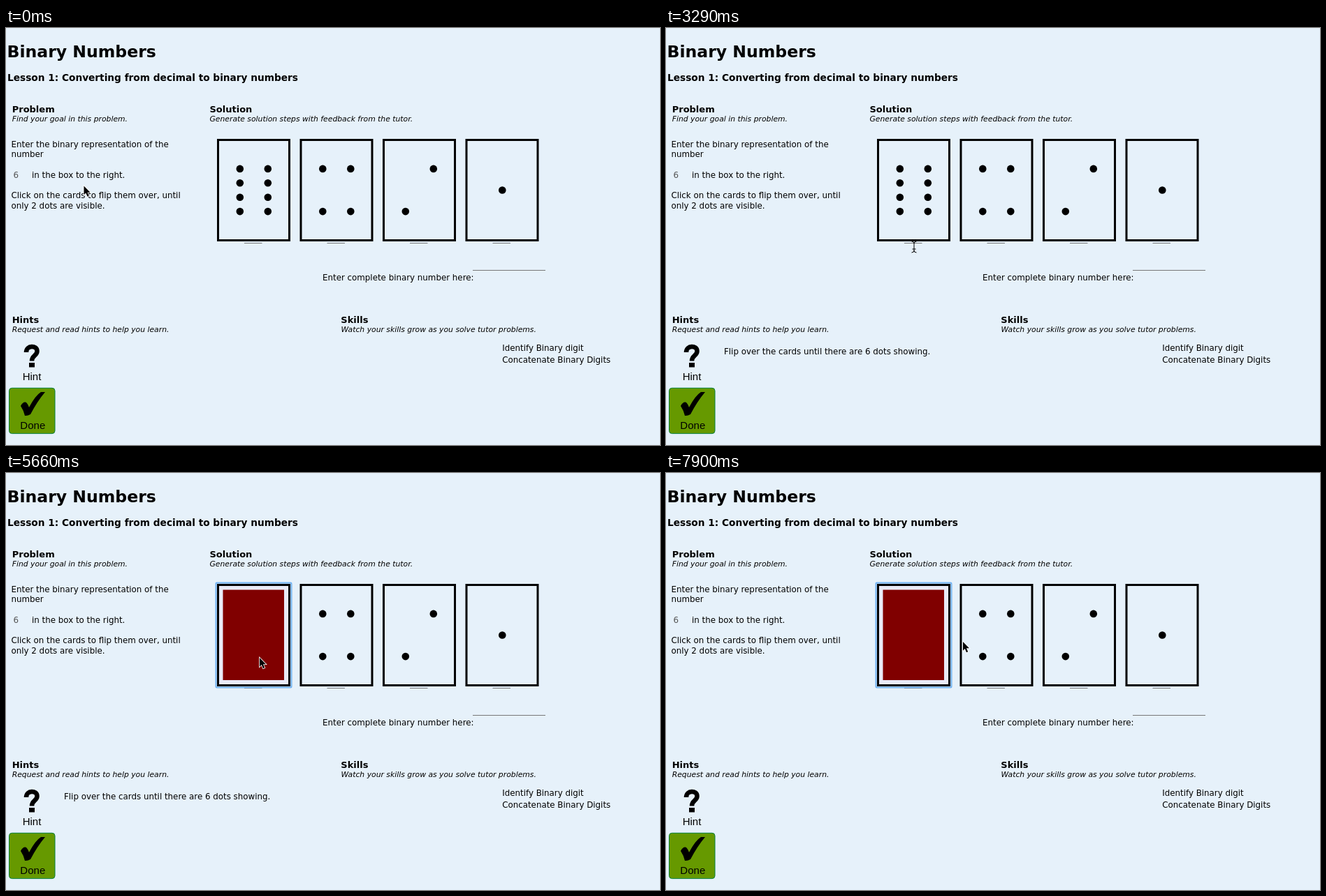
Recreate the animation shown at these times as an HTML page. Size 936x598 px, loop 8 s.

```html
<!DOCTYPE html>
<html lang="en">
<head>
<meta charset="utf-8">
<title>Binary lesson</title>
<style>
html, body { margin: 0; width: 100%; height: 100%; overflow: hidden; background: #e6f1fa; }
svg { display: block; }
text { font: 11.85px "DejaVu Sans", Verdana, sans-serif; }
.title { font-size: 23.55px; font-weight: bold; }
.lesson { font-size: 13.7px; font-weight: bold; }
.head { font-size: 13px; font-weight: bold; }
.note { font-size: 10.8px; font-style: italic; }
.button { font: 15px "Liberation Sans", Arial, sans-serif; text-anchor: middle; }
.line { stroke: #777; fill: none; }
.card { stroke: #000; stroke-width: 3; fill: none; }
</style>
</head>
<body>
<svg width="936" height="598" viewBox="0 0 936 598">
  <text class="title" x="1.5" y="42">Binary Numbers</text>
  <text class="lesson" x="2" y="76">Lesson 1: Converting from decimal to binary numbers</text>

  <text class="head" x="8.7" y="120.5">Problem</text>
  <text class="note" x="8.7" y="134.3">Find your goal in this problem.</text>
  <text x="7.5" y="171">Enter the binary representation of the</text>
  <text x="7.5" y="185">number</text>
  <text x="10.5" y="215" fill="#555">6</text>
  <text x="37" y="215">in the box to the right.</text>
  <text x="7.5" y="244">Click on the cards to flip them over, until</text>
  <text x="7.5" y="259">only 2 dots are visible.</text>

  <text class="head" x="291.5" y="120.5">Solution</text>
  <text class="note" x="291.5" y="134.3">Generate solution steps with feedback from the tutor.</text>
  <g id="cards"></g>
  <path class="line" d="M668 347.5H772"/>
  <text x="453" y="361.5">Enter complete binary number here:</text>

  <g id="back">
    <rect x="300.5" y="157.5" width="108" height="150" rx="1" fill="none" stroke="#6fb1f2" stroke-width="2"/>
    <rect class="card" x="303.5" y="160.5" width="102" height="144" style="fill: #e9ebf8"/>
    <rect x="310.5" y="167.5" width="87.5" height="129.5" fill="#800000"/>
  </g>
  <g id="field">
    <rect x="341.5" y="308.5" width="25" height="19.5" rx="1" fill="#e8f3fc" stroke="#4a97ea" stroke-width="1.8"/>
    <text id="digit" x="344" y="322.5">1</text>
    <path id="caret" d="M0 311V325" stroke="#000"/>
  </g>

  <text class="head" x="8.7" y="422.5">Hints</text>
  <text class="note" x="8.7" y="436.3">Request and read hints to help you learn.</text>
  <path d="M29 465C29 454.5 44.5 454.5 44.5 463.5C44.5 470 37 469.5 37 477.5" fill="none" stroke="#000" stroke-width="6.5"/>
  <rect x="33" y="480" width="8" height="6.5"/>
  <text class="button" x="37" y="504.7">Hint</text>
  <rect x="4.5" y="516.3" width="65.5" height="65.3" rx="4" fill="#690" stroke="#07803c"/>
  <path d="M21 542Q24 536 28 536.5Q31 538 33 544Q42 527 50 522H56Q45 535 35 554Q31 556.5 27 556Q25 548 21 542Z"/>
  <text class="button" x="38.3" y="575">Done</text>
  <text id="hint" x="83" y="468">Flip over the cards until there are 6 dots showing.</text>

  <text class="head" x="479.3" y="422.5">Skills</text>
  <text class="note" x="479.5" y="436.3">Watch your skills grow as you solve tutor problems.</text>
  <text x="710.2" y="463">Identify Binary digit</text>
  <text x="710.2" y="480">Concatenate Binary Digits</text>

  <path id="arrow" d="M0 0V12.8L2.8 10L5 15.2L7.2 14.3L5 9.3H9Z" stroke="#fff" stroke-width="1.6" paint-order="stroke"/>
  <path id="beam" d="M-3.5-8Q0-8 0-5Q0-8 3.5-8M0-5V5M-3.5 8Q0 8 0 5Q0 8 3.5 8M-2.5 3H2.5" fill="none" stroke="#000"/>
</svg>
<script>
const $ = id => document.getElementById(id);
const LOOP = 8000;
const TICK = 149.1; // the screen was sampled about 6.7 times a second

// Dots as [column, row] offsets from the centre of a card.
const pairs = rows => rows.flatMap(row => [[-1, row], [1, row]]);
const cardDots = [
  pairs([-1.5, -0.5, 0.5, 1.5]),
  pairs([-1.5, 1.5]),
  [[1, -1.5], [-1, 1.5]],
  [[0, 0]]
];
$('cards').innerHTML = cardDots.map((dots, i) => `
  <g transform="translate(${354.8 + i * 118.5} 232.5)">
    <rect class="card" x="-51.3" y="-72" width="102" height="144"/>
    ${dots.map(([col, row]) => `<circle cx="${col * 20}" cy="${row * 20.4}" r="5.3"/>`).join('')}
    <path class="line" d="M-13.8 76H11.7"/>
  </g>`).join('');

// Pointer stops: tick, x, y. It eases from one to the next.
const stops = [
  [2, 111.5, 226.5], [4, 210, 199], [6, 382.5, 258], [11, 355, 305], [14, 355, 314],
  [25, 355, 314], [31, 250, 475], [32, 250, 475], [34, 324.5, 305.5], [37, 363, 265],
  [47, 363, 265], [51, 772, 257], [53, 425, 242]
];

function pointerAt(tick) {
  const next = stops.findIndex(stop => stop[0] > tick);
  if (next === 0) return stops[0].slice(1);
  if (next < 0) return stops.at(-1).slice(1);
  const [t0, x0, y0] = stops[next - 1];
  const [t1, x1, y1] = stops[next];
  const u = (tick - t0) / (t1 - t0);
  const eased = u * u * (3 - 2 * u);
  return [x0 + (x1 - x0) * eased, y0 + (y1 - y0) * eased];
}

const show = (id, on) => { $(id).style.display = on ? '' : 'none'; };
const move = (id, x, y) => $(id).setAttribute('transform', `translate(${x} ${y})`);

function draw(now) {
  const tick = Math.floor((now % LOOP + 10) / TICK);
  const within = (from, to) => tick >= from && tick < to;
  const [x, y] = pointerAt(tick);
  const overField = within(14, 26);
  move('arrow', x, y);
  move('beam', x, y);
  show('arrow', !overField);
  show('beam', overField);

  const typed = tick >= 20;
  show('field', within(15, 22));
  show('digit', typed);
  show('caret', tick !== 19);
  move('caret', typed ? 352.5 : 344.5, 0);

  show('hint', within(22, 39));
  show('back', tick >= 38);
}

const start = performance.now();
function frame() {
  draw(performance.now() - start);
  requestAnimationFrame(frame);
}
frame();
</script>
</body>
</html>
```
